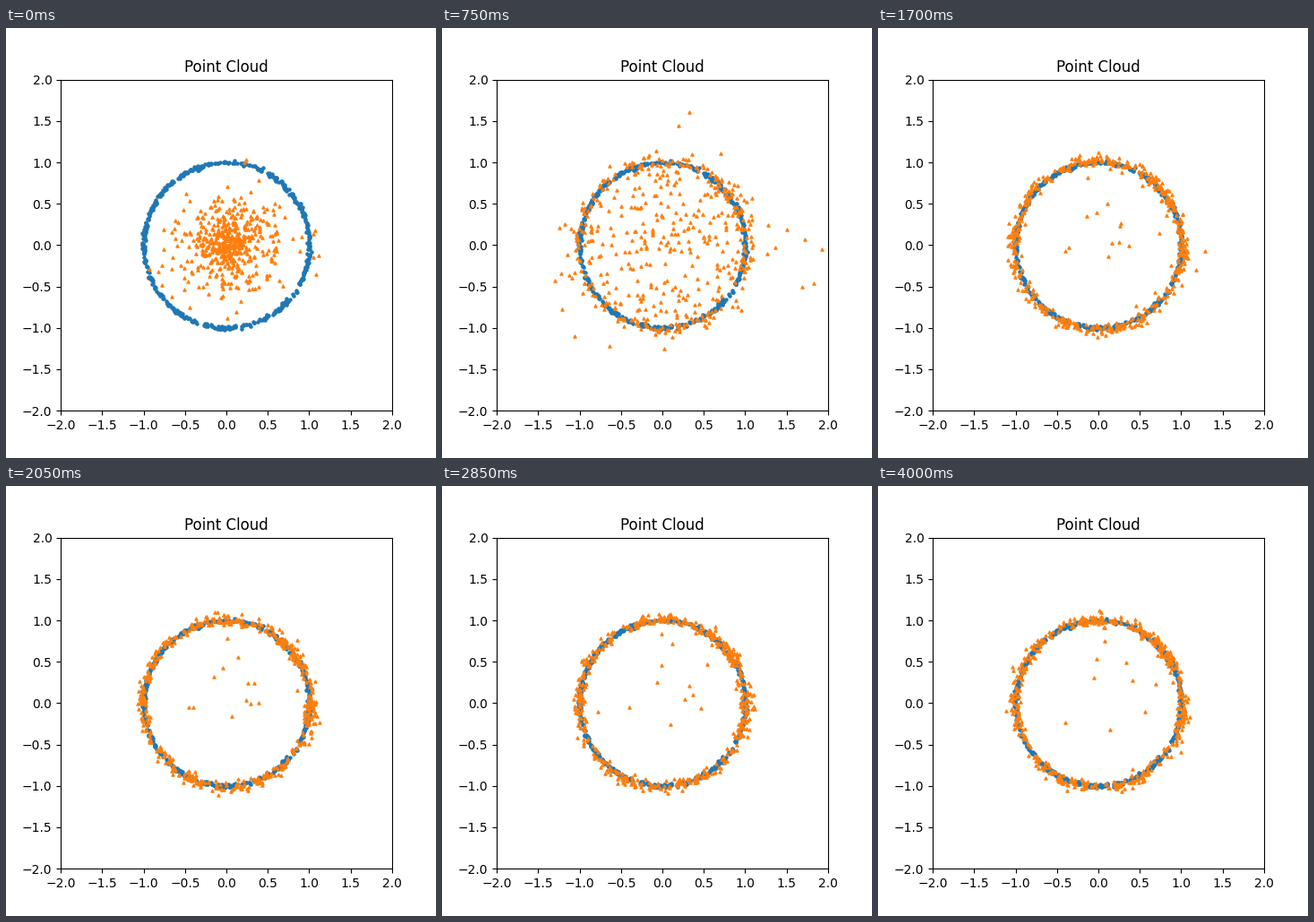
Write a matplotlib script that moves like this. It is 480 px wide and 480 px high and loops after 4.05 s.

```python
import numpy as np
import matplotlib.pyplot as plt
from matplotlib.animation import FuncAnimation

FRAMES, STEP_MS = 81, 50
COUNT, SLOW = 500, 20
CLUSTERS, CLUSTER_PHASE = 7, np.radians(40)
rng = np.random.default_rng(3)


def polar(r, a):
    return np.column_stack([r * np.cos(a), r * np.sin(a)])


def random_angles(n):
    return rng.uniform(0, 2 * np.pi, n)


def make_ring():
    return polar(rng.normal(1, 0.011, COUNT), random_angles(COUNT))


def make_start():
    """A long-tailed blob, plus a few slow points just above its centre."""
    n = COUNT - SLOW
    radius = 0.38 * np.minimum(rng.exponential(size=n), 6.2) ** 0.6
    core = rng.normal((0.03, 0.07), 0.13, (SLOW, 2))
    return np.vstack([polar(radius, random_angles(n)), core])


def advance(pts, i, speed, noise):
    """Spread outwards first, then get pulled onto the circle."""
    r, a = np.hypot(*pts.T), np.arctan2(pts[:, 1], pts[:, 0])
    ramp = np.clip((i - 6) / 5, 0, 1)
    rim = 1.005 + 0.025 * np.exp(-max(0, i - 18) / 12)
    gap = r - rim
    pull = np.where(gap > 0, 6 * gap / (1 + (gap / 0.3) ** 2),
                    9 * r ** 1.6 * gap)
    grow = 1 + 0.083 * max(0, 1 - i / 13)
    r = r * grow - ramp * speed * pull * STEP_MS / 1000
    # Points gather at evenly spaced angles.
    a = a - 0.0018 * ramp * np.sin(CLUSTERS * (a - CLUSTER_PHASE))
    return polar(r, a) + rng.normal(size=pts.shape) * noise[:, None]


def make_cloud():
    speed, noise = np.ones(COUNT), np.full(COUNT, 0.028)
    speed[-SLOW:] = np.geomspace(0.02, 0.9, SLOW)
    noise[-SLOW:] = 0.014
    path = [make_start()]
    for i in range(FRAMES - 1):
        path.append(advance(path[-1], i, speed, noise))
    return path


ring = make_ring()
cloud = make_cloud()

fig, ax = plt.subplots(figsize=(4.8, 4.8), dpi=100)
ticks = np.arange(-2, 2.1, 0.5)
ax.set(aspect="equal", xlim=(-2, 2), ylim=(-2, 2), xticks=ticks, yticks=ticks,
       title="Point Cloud")
ax.scatter(*ring.T, s=5, color="C0")
moving = ax.scatter(*cloud[0].T, s=5, marker="^", color="C1")


def update(i):
    moving.set_offsets(cloud[i])
    return moving,


anim = FuncAnimation(fig, update, frames=FRAMES, interval=STEP_MS,
                     repeat=True, repeat_delay=0)
plt.show()
```
